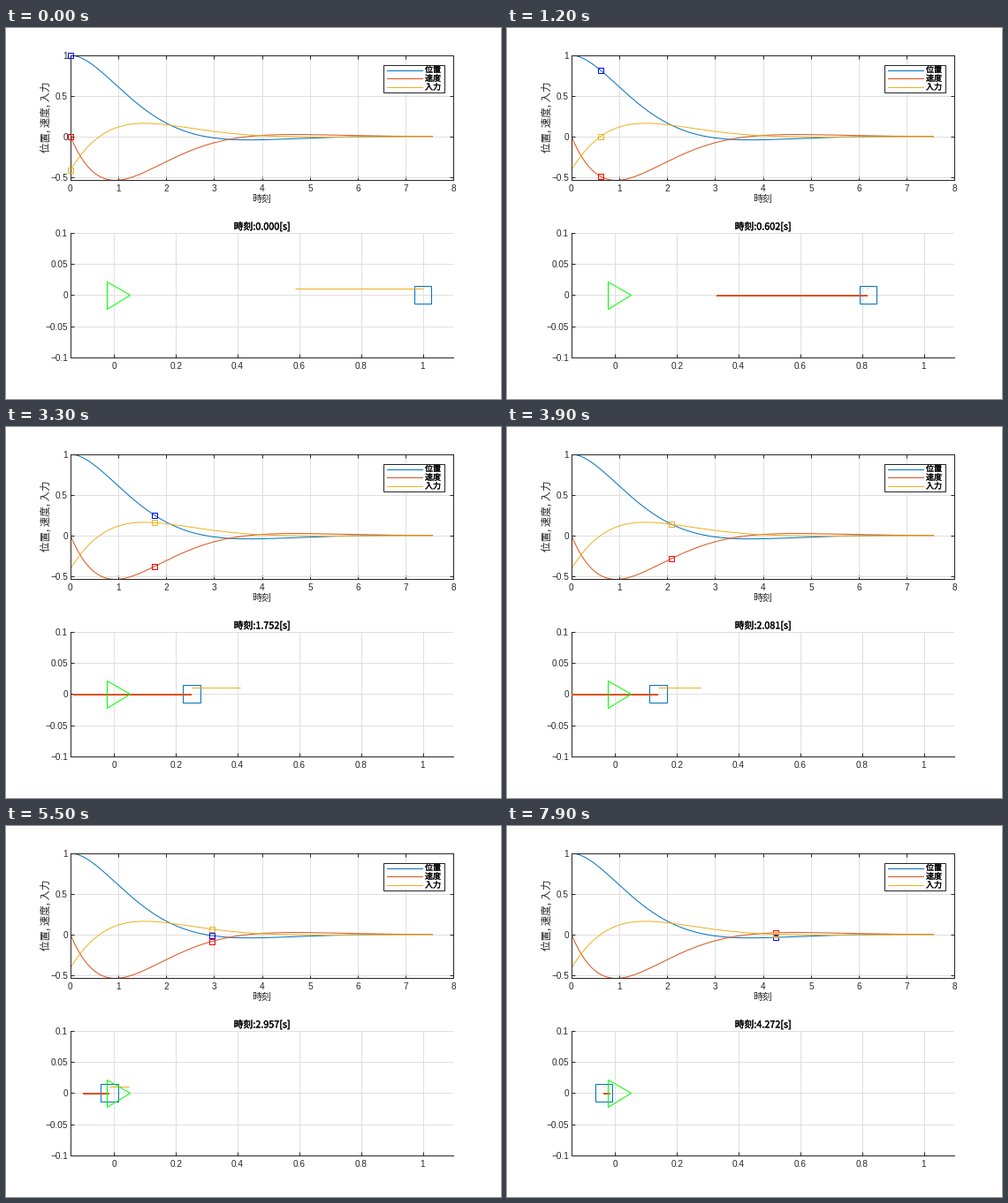
These frames come from a looping animation (560 by 420 pixels, 8000 ms). A matplotlib script:

```python
import numpy as np
import matplotlib.pyplot as plt
from matplotlib.animation import FuncAnimation
from matplotlib.patches import Polygon, Rectangle
from matplotlib.patheffects import Normal, Stroke

W, H, DPI = 560, 420, 100
PX = 72 / DPI  # points per pixel
FRAMES, INTERVAL = 80, 100
DT = 0.054764
BLUE, RED, YELLOW = "#0072BD", "#D95319", "#EDB120"
INK, GRID = "#262626", "#DFDFDF"
KANJI = "Noto Sans CJK JP"

# Optimal regulator for x'' = -x - x' + u with unit weights
K_POS = np.sqrt(2) - 1
K_VEL = np.sqrt(2 * np.sqrt(2)) - 1
RATE = (1 + K_VEL) / 2


def state(t):
    decay, s = np.exp(-RATE * t), RATE * t
    pos = decay * (np.cos(s) + np.sin(s))
    vel = -2 * RATE * decay * np.sin(s)
    return pos, vel, -K_POS * pos - K_VEL * vel


def step_time(i):
    return (i if i <= 10 else i - 1) * DT


fig = plt.figure(figsize=(W / DPI, H / DPI), dpi=DPI, facecolor="white")


def make_axes(top, bottom, xlim, ylim, xticks, yticks, boxed):
    left, right = 72.9, 506.48
    ax = fig.add_axes([left / W, 1 - bottom / H, (right - left) / W, (bottom - top) / H])
    ax.set(xlim=xlim, ylim=ylim)

    def names(ticks):
        return [f"{v:g}".replace("-", "\u2212") for v in ticks]

    ax.set_xticks(xticks, names(xticks))
    ax.set_yticks(yticks, names(yticks))
    ax.tick_params(direction="in", length=4.3 * PX, width=PX, pad=5 * PX, color=INK,
                   labelcolor=INK, labelsize=10 * PX, labelfontfamily="Liberation Sans",
                   top=boxed, right=boxed)
    ax.tick_params(axis="y", pad=3 * PX)
    ax.grid(color=GRID, linewidth=PX)
    ax.set_axisbelow(True)
    for side, spine in ax.spines.items():
        spine.set(color=INK, linewidth=PX, visible=boxed or side in ("left", "bottom"))
    return ax


def label(x, y, text, size, bold=False, **kw):
    kw = {"ha": "center", "va": "center", "color": INK, **kw}
    item = fig.text(x / W, 1 - y / H, text, family=KANJI, fontsize=size * PX, **kw)
    if bold:
        item.set_path_effects([Stroke(linewidth=0.3 * PX, foreground=kw["color"]), Normal()])
    return item


plot = make_axes(31, 172.45, (0, 8), (-0.542, 1),
                 range(9), [-0.5, 0, 0.5, 1], True)
track = make_axes(231.6, 373.2, (-0.1415, 1.1), (-0.1, 0.1),
                  [0, 0.2, 0.4, 0.6, 0.8, 1], [-0.1, -0.05, 0, 0.05, 0.1], False)

times = np.arange(139) * DT
for series, color in zip(state(times), (BLUE, RED, YELLOW)):
    plot.plot(times, series, color=color, linewidth=PX)

label(289.5, 193.5, "時刻", 11)
label(45.5, 101, "位置, 速度, 入力", 11.5, rotation=90)
title = label(289.5, 225.3, "", 10.8, bold=True, color="black")

# Legend
fig.add_artist(Rectangle((427 / W, 1 - 73 / H), 69 / W, 31 / H, transform=fig.transFigure,
                         facecolor="white", edgecolor=INK, linewidth=PX, zorder=3))
for row, (name, color) in enumerate(zip(("位置", "速度", "入力"), (BLUE, RED, YELLOW))):
    y = 47.6 + 9.8 * row
    fig.add_artist(plt.Line2D([431 / W, 471 / W], [1 - y / H] * 2, color=color,
                              linewidth=PX, zorder=4))
    label(474, y, name, 9, bold=True, ha="left", color="black", zorder=4)

markers = [plot.plot([], [], "s", markersize=6 * PX, markerfacecolor="none",
                     markeredgecolor=color, markeredgewidth=PX, clip_on=False, zorder=5)[0]
           for color in ("blue", "red", YELLOW)]


def regular(sides, radius, turn=0):
    a = turn + 2 * np.pi * np.arange(sides) / sides
    return np.column_stack([radius * np.cos(a), radius * np.sin(a) / 2])


def outline(points, color, zorder):
    return track.add_patch(Polygon(points, fill=False, edgecolor=color, linewidth=PX,
                                   snap=True, zorder=zorder))


BODY = regular(4, 0.04, np.pi / 4)
BAR_Y = -0.0005  # keeps the thick bar on whole pixels
body = outline(BODY, BLUE, 3)
outline(regular(3, 0.05), "#00FF00", 5)
vel_bar, = track.plot([], [], color=RED, linewidth=2 * PX, solid_capstyle="butt", zorder=4)
input_bar, = track.plot([], [], color=YELLOW, linewidth=PX, solid_capstyle="butt", zorder=4)


def update(i):
    t = step_time(i)
    pos, vel, force = state(t)
    for marker, value in zip(markers, (pos, vel, force)):
        marker.set_data([t], [value])
    body.set_xy(BODY + [pos, 0])
    vel_bar.set_data([pos, pos + vel], [BAR_Y, BAR_Y])
    input_bar.set_data([pos, pos + force], [0.01, 0.01])
    title.set_text(f"時刻:{t:.3f}[s]")
    return [*markers, body, vel_bar, input_bar, title]


anim = FuncAnimation(fig, update, frames=FRAMES, interval=INTERVAL,
                     repeat=True, repeat_delay=0, blit=False)
plt.show()
```
